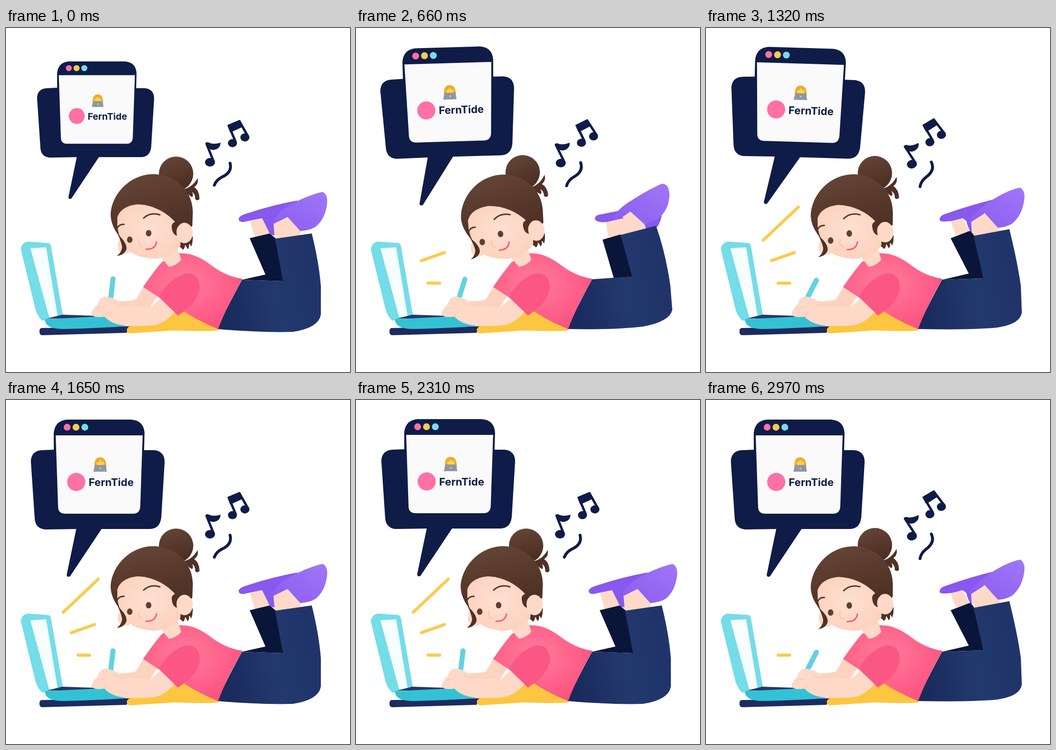
These frames come from a looping animation (720 by 720 pixels, 3300 ms). An HTML page:

```html
<!DOCTYPE html>
<html lang="en">
<head>
<meta charset="utf-8">
<title>Girl learning to code</title>
<style>
html, body { margin: 0; height: 100%; overflow: hidden; background: #fff; }
svg { display: block; width: 100vw; height: 100vh; }
.line { fill: none; stroke-linecap: round; stroke-linejoin: round; }
.navy { fill: #0e1c47; }
.skin { fill: #fed9c8; }
.strand { fill: #4f3125; }
text { font: 700 22px Inter, sans-serif; }
</style>
</head>
<body>
<svg viewBox="0 0 720 720">
<defs>
  <linearGradient id="hair" x1="0.3" y1="0" x2="0.6" y2="1">
    <stop offset="0" stop-color="#644536"/><stop offset="1" stop-color="#4a2c21"/>
  </linearGradient>
  <radialGradient id="face" cx="0.5" cy="0.45" r="0.6">
    <stop offset="0" stop-color="#fee0d2"/><stop offset="1" stop-color="#fdd1bd"/>
  </radialGradient>
  <radialGradient id="shirt" cx="0.42" cy="0.4" r="0.65">
    <stop offset="0" stop-color="#ff7d9b"/><stop offset="0.65" stop-color="#ff6089"/><stop offset="1" stop-color="#f7537f"/>
  </radialGradient>
  <linearGradient id="pants" gradientUnits="userSpaceOnUse" x1="460" y1="590" x2="640" y2="560">
    <stop offset="0" stop-color="#1a2a5c"/><stop offset="0.6" stop-color="#23396e"/><stop offset="1" stop-color="#203469"/>
  </linearGradient>
  <linearGradient id="shoe" x1="0" y1="1" x2="1" y2="0">
    <stop offset="0" stop-color="#8a5cee"/><stop offset="1" stop-color="#a077f8"/>
  </linearGradient>
</defs>

<!-- desk and laptop -->
<path fill="#1d2b60" d="M74 628L262 624L252 638L76 643Q70 643 70 635Q70 629 74 628Z"/>
<path fill="#74dde8" d="M31 463Q33 449 46 447L88 450Q93 451 94 456L119 601L90 613L75 612Q66 602 62 590Z"/>
<path fill="#f6fdff" d="M51 461L84 459L108 603L91 608Z"/>
<path fill="#26376c" d="M86 608L118 600L205 603L185 608Z"/>
<path fill="#33c2d4" d="M82 609Q140 607 205 603L252 624Q200 628 120 630Q86 630 82 614Z"/>

<path fill="#fcc640" d="M257 625L330 598L372 592Q410 604 446 632Q440 636 350 633L262 639Q252 640 253 630Z"/>

<g class="pose">
  <path class="skin" d="M510 403L538 397L553 431L521 438ZM563 441L558 409L588 393L618 424L617 434Z"/>
  <path fill="#0a1639" d="M510 440L552 430L565 441L581 530L494 527L543 516Z"/>
  <path fill="#8858ef" d="M487 400Q487 395 496 391Q550 372 610 361L600 390L560 410L562 434Q552 434 549 424L536 398Q515 402 497 406Q487 406 487 400Z"/>
  <path fill="url(#shoe)" d="M557 411Q562 385 610 362Q640 348 662 343Q674 347 672 368Q668 400 648 416Q635 424 616 425L588 394Z"/>
  <path fill="url(#pants)" d="M442 630Q462 585 494 527L580 530L563 441L640 430Q655 490 659 540L659 600Q654 628 600 636Q540 638 442 630Z"/>
</g>
<g class="pose">
  <path class="skin" d="M512 404L537 399L553 428L523 434ZM560 436L555 405L583 387L615 418L614 427Z"/>
  <path fill="#0a1639" d="M512 440L554 424L562 436L581 524L494 527L550 514Z"/>
  <path fill="#8858ef" d="M489 401Q489 395 496 391Q545 373 605 358L580 390L555 406L557 430Q548 420 545 404L537 398Q510 406 497 405Q489 405 489 401Z"/>
  <path fill="url(#shoe)" d="M553 406Q555 388 602 358Q635 338 658 334Q669 342 666 360Q662 392 640 410Q628 417 611 418L583 387Z"/>
  <path fill="url(#pants)" d="M442 630Q462 585 494 527L581 524L560 435L635 421Q652 490 659 540L661 595Q658 622 600 628Q540 632 442 630Z"/>
</g>
<g class="pose">
  <path class="skin" d="M523 406L550 399L574 383L606 410L607 422L554 435L528 438Z"/>
  <path fill="#0a1639" d="M516 443L554 432L579 521L540 525Z"/>
  <path fill="#8858ef" d="M500 400Q500 393 508 391L548 383L560 398L525 406Q504 408 500 400ZM604 411L640 392Q637 408 630 417L607 420Z"/>
  <path fill="url(#shoe)" d="M536 402Q545 380 575 362Q612 338 640 326Q655 326 656 348Q656 375 638 394Q622 407 604 411L574 384Q552 402 536 402Z"/>
  <path fill="url(#pants)" d="M442 630Q462 585 494 526L578 520L554 433L628 414Q648 470 658 540L662 590Q656 615 600 625Q540 632 442 630Z"/>
</g>

<!-- torso and arms -->
<path fill="#fdd3c0" d="M288 541L317 561L301 585L225 584L225 571Q252 574 272 568Z"/>
<path fill="url(#shirt)" d="M326 490Q305 515 287 542L325 567L360 602L371 592Q400 612 444 630Q462 582 495 525Q460 520 430 497Q400 474 375 472L360 471Z"/>
<path id="pen" class="line" stroke="#62d2de" stroke-width="10.500"/>
<path class="skin" d="M192 578Q196 562 210 562Q228 565 237 574Q234 581 270 583L303 584L325 565L352 596Q330 619 310 622Q280 625 250 623Q220 620 206 604Q187 607 180 601Q176 594 192 578Z"/>
<path class="line" stroke="#fbc7b2" stroke-width="1.500" d="M188 587Q198 582 206 586M207 603Q208 598 214 596M225 574Q230 581 250 582"/>
<path fill="#fb5785" d="M320 563Q340 525 375 514Q405 510 406 545Q400 575 371 594L360 602Z"/>
<path class="skin" d="M326 482L341 500Q356 498 367 485L358 458Z"/>

<g id="head">
  <path class="strand" d="M370 338Q390 334 401 314Q404 326 394 333Q405 341 405 358Q400 363 396 358Q397 348 389 343Q393 349 390 354Q385 352 378 345Z"/>
  <circle fill="url(#hair)" cx="356" cy="305" r="36"/>
  <path class="strand" d="M358 452L391 436Q391 452 387 458Q386 452 383 452Q384 460 380 463Q377 456 375 454Q374 462 370 464Q364 456 358 458Z"/>
  <path class="skin" d="M238 441Q231 455 236 466Q242 475 256 472L264 466L252 440Z"/>
  <path fill="url(#hair)" d="M241 441Q219 415 219 390C221 349 257 308 305 306C352 304 392 340 391 386L390 414L350 450Z"/>
  <path fill="url(#face)" d="M233 396Q241 372 277 369Q324 372 357 409L366 430L365 456Q348 480 310 483Q275 481 258 467Q238 450 233 415Z"/>
  <ellipse class="skin" cx="373.500" cy="429" rx="17.500" ry="21.500"/>
  <path class="strand" d="M366 404Q345 404 347 418Q348 432 358 435Q354 420 364 411Z"/>
  <path class="strand" d="M234 432Q257 453 251 466Q245 476 232 477Q242 470 243 459Q242 449 234 432Z"/>
  <path class="line" stroke="#56372a" stroke-width="3" d="M288 398Q302 385 322 391M233 418Q238 410 247 411"/>
  <ellipse fill="#5d4030" cx="298.500" cy="429.500" rx="5.800" ry="6.800"/>
  <ellipse fill="#5d4030" cx="259" cy="443" rx="5.800" ry="6.800"/>
  <path class="line" stroke="#f9c5a6" stroke-width="2.500" d="M279 442Q275 455 286 457"/>
  <path class="line" stroke="#f9597f" stroke-width="3" d="M293 463Q312 464 315 448"/>
</g>

<!-- music -->
<g id="pair">
  <ellipse class="navy" cx="474" cy="241" rx="9.500" ry="8.500"/><ellipse class="navy" cx="500" cy="229" rx="9.500" ry="8.500"/>
  <path class="navy" stroke="#0e1c47" stroke-width="3" stroke-linejoin="round" d="M465 204L489 194L494 206L470 217Z"/>
  <path class="line" stroke="#0e1c47" stroke-width="5" d="M467 206L480 237M489 196L506 226"/>
</g>
<g id="single">
  <ellipse class="navy" cx="427" cy="281" rx="10.500" ry="9"/>
  <path class="line" stroke="#0e1c47" stroke-width="5" d="M420 243L434 278"/>
  <path class="navy" d="M417 241Q421 237 427 241Q437 244 449 240Q449 252 436 255Q428 256 422 250Z"/>
</g>
<path id="wave" class="line" stroke="#0e1c47" stroke-width="6" d="M436 329Q440 318 452 312Q474 302 469 283"/>

<g class="line" stroke="#fbcb4d" stroke-width="6.500">
  <path class="ray" d="M151 534H175"/>
  <path class="ray" d="M137 487L185 470"/>
  <path class="ray" d="M120 444L193 375"/>
</g>

<g id="bubble">
  <path class="navy" d="M52 128Q53 106 76 105L100 104V68Q103 43 128 41H262Q289 43 290 70L289 105H310Q332 107 332 130L325 246Q322 270 300 270L200 270L134 369Q128 372 127 366L147 270L82 271Q61 269 60 247Z"/>
  <path fill="#fafafb" d="M104 74H286L281 223Q280 238 266 238H124Q109 238 109 223Z"/>
  <circle fill="#ff70a5" cx="128" cy="57" r="7.200"/><circle fill="#fbcb4d" cx="146.500" cy="57" r="7.200"/><circle fill="#74dde8" cx="165" cy="57" r="7.200"/>
  <g>
    <path fill="#f0ab2a" d="M185 140Q184 120 197 120Q210 120 210 140Z"/>
    <ellipse fill="#fdd34e" cx="197.500" cy="131" rx="8" ry="8.500"/>
    <path fill="#f0ab2a" d="M188 131Q190 122 199 121Q206 124 207 131Q199 129 197 125Q196 130 188 131Z"/>
    <path fill="#8f97a3" d="M186 136H209L211 150H183Z"/>
    <circle fill="#d9dde3" cx="197.500" cy="143" r="1.500"/>
  </g>
  <circle fill="#ff70a5" cx="147" cy="171.500" r="19"/>
  <text class="navy" x="173" y="180">FernTide</text>
</g>
</svg>
<script>
const STEP = 330;
const $ = id => document.getElementById(id);
const all = name => [...document.getElementsByClassName(name)];
const legs = all('pose'), rays = all('ray');

const poses = [0, 1, 2, 0, 1, 0, 1, 0, 2, 1];
const rayCounts = [0, 1, 2, 3, 3, 3, 3, 3, 2, 1];
const small = 'translate(19.5 34.1) scale(.875)', raised = 'translate(1 -1)';
const left = 'rotate(-1.7 180 165)', right = 'rotate(1.7 180 165)';
const bubbles = [small, '', left, raised, right, '', right, raised, left, ''];

const pens = ['M224 525L219 567', 'M231 528L211 567', 'M228 526L215 567'];
const headTurn = [0, -1.8, -5];
const swing = [0, 1, 0.4];

const set = (id, value, name = 'transform') => $(id).setAttribute(name, value);
const show = (el, on) => el.style.display = on ? '' : 'none';

function move(id, amount, dx, dy, angle, x, y) {
  set(id, `translate(${dx * amount} ${dy * amount}) rotate(${angle * amount} ${x} ${y})`);
}

function draw(time) {
  const step = Math.floor(time / STEP) % poses.length;
  const pose = poses[step], s = swing[pose];
  legs.forEach((el, i) => show(el, i === pose));
  rays.forEach((el, i) => show(el, i < rayCounts[step]));
  set('pen', pens[pose], 'd');
  set('head', `rotate(${headTurn[pose]} 318 385)`);
  set('bubble', bubbles[step]);
  move('pair', s, -5.5, -2, -8, 474, 240);
  move('single', s, 4, 4, -11, 427, 281);
  move('wave', s, 12, 3, -11, 436, 329);
}

const start = performance.now();
function tick() {
  draw(performance.now() - start);
  requestAnimationFrame(tick);
}
tick();
</script>
</body>
</html>
```
